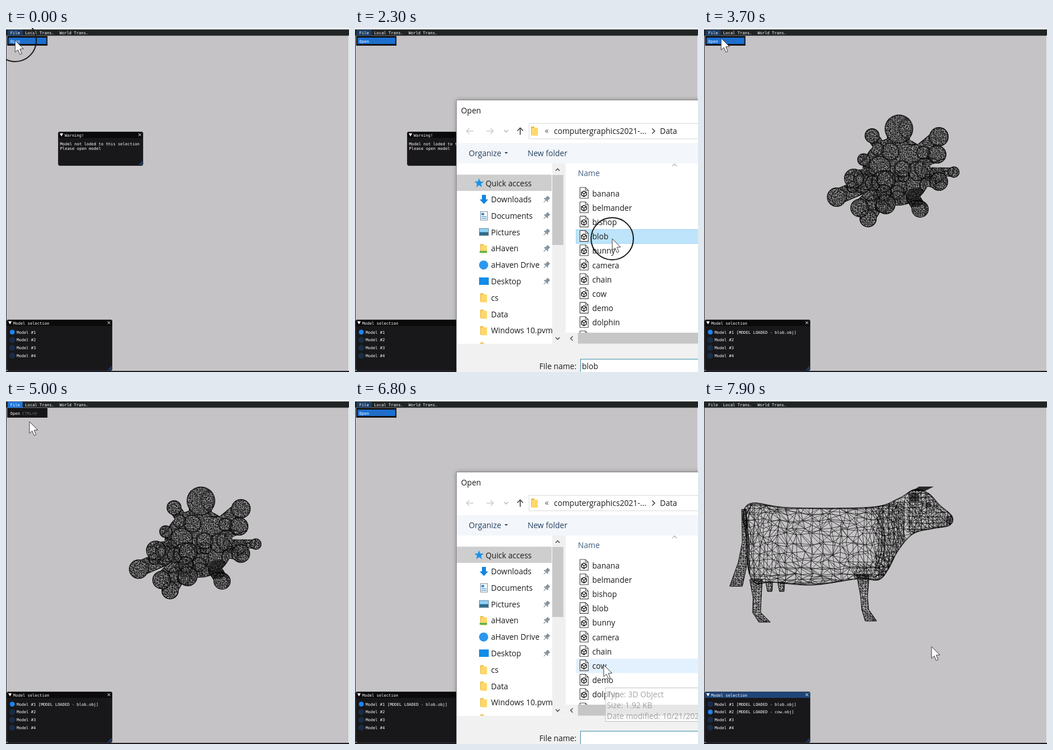
An HTML page with a canvas for the animation above (8 s loop, 600x604 px).

```html
<!DOCTYPE html>
<html lang="en">
<head>
<meta charset="utf-8">
<title>Model viewer</title>
<style>
html, body { margin: 0; width: 100%; height: 100%; overflow: hidden; background: #c5c3c5; }
canvas { display: block; }
</style>
</head>
<body>
<canvas id="stage" width="600" height="604"></canvas>
<script>
const LOOP = 8000, TAU = 2 * Math.PI, BACK = '#c5c3c5';
const MONO = '7px "DejaVu Sans Mono", monospace';
const SANS = '13.6px "Open Sans", "Noto Sans", sans-serif';
const files = ['banana', 'belmander', 'bishop', 'blob', 'bunny', 'camera', 'chain', 'cow', 'demo', 'dolphin', 'duck'];
const places = ['Downloads', 'Documents', 'Pictures', 'aHaven', 'aHaven Drive', 'Desktop', 'cs', 'Data', 'Windows 10.pvm', ''];
// Pointer moves: start, end, x, y
const moves = [
  [700, 1000, 180, 139], [1000, 2100, 450, 370], [2400, 2900, 600, 620], [3000, 3700, 30, 18],
  [3900, 4100, 16, 22], [4500, 4700, 16, 8], [4700, 5000, 41, 38], [5000, 5400, 35, 23],
  [5900, 6500, 435, 465], [7000, 7400, 600, 620], [7500, 7900, 398, 433]
];
const clicks = [[0, 100], [2200, 2400], [4300, 4400], [5500, 5700], [7000, 7100]];

let g = document.getElementById('stage').getContext('2d');

function randomizer(seed) {
  return () => (seed = (seed * 16807) % 2147483647) / 2147483647;
}
function box(x, y, w, h, fill, r = 0) {
  g.fillStyle = fill;
  g.beginPath();
  g.roundRect(x, y, w, h, r);
  g.fill();
}
function frame(x, y, w, h, color) {
  g.strokeStyle = color;
  g.lineWidth = 1;
  g.strokeRect(x + .5, y + .5, w - 1, h - 1);
}
function disc(x, y, r, fill) {
  g.fillStyle = fill;
  g.beginPath();
  g.arc(x, y, r, 0, TAU);
  g.fill();
}
function ring(x, y, r, color, width) {
  g.beginPath();
  g.arc(x, y, r, 0, TAU);
  g.strokeStyle = color;
  g.lineWidth = width;
  g.stroke();
}
function text(s, x, y, color = '#fff', font = MONO) {
  g.font = font;
  g.fillStyle = color;
  g.fillText(s, x, y + (font === MONO ? 2.5 : 5));
}
function trace(p) {
  g.beginPath();
  for (let i = 0; i < p.length; i += 2) g.lineTo(p[i], p[i + 1]);
}
function poly(p, fill) {
  trace(p);
  g.fillStyle = fill;
  g.fill();
}
function line(p, color, width = 1) {
  trace(p);
  g.strokeStyle = color;
  g.lineWidth = width;
  g.stroke();
}
function ngon(x, y, n, outer, inner = outer) {
  return Array.from({ length: n }, (_, k) => {
    const a = k / n * TAU - TAU / 4, r = k % 2 ? inner : outer;
    return [x + r * Math.cos(a), y + r * Math.sin(a)];
  }).flat();
}
// Chevron pointing right, rotated by quarter turns
function chevron(x, y, size, turns, color, width = 1.6) {
  g.save();
  g.translate(x, y);
  g.rotate(turns * TAU / 4);
  line([-size / 2, -size, size / 2, 0, -size / 2, size], color, width);
  g.restore();
}
function clipped(path, draw) {
  g.save();
  g.clip(path);
  draw();
  g.restore();
}
function area(x, y, w, h) {
  const path = new Path2D();
  path.rect(x, y, w, h);
  return path;
}
function prerender(draw) {
  const c = document.createElement('canvas'), main = g;
  c.width = 600;
  c.height = 604;
  g = c.getContext('2d');
  draw();
  g = main;
  return c;
}

// Jittered triangle grid whose cells shrink towards the edges of the box
function mesh([x0, y0, x1, y1], step, width, seed, squeeze = .45) {
  const rnd = randomizer(seed);
  const cols = Math.ceil((x1 - x0) / step), rows = Math.ceil((y1 - y0) / step);
  const warp = u => u - squeeze * Math.sin(u * TAU) / TAU;
  const pts = [];
  for (let j = 0; j <= rows; j++) {
    pts.push([]);
    for (let i = 0; i <= cols; i++) {
      pts[j].push([
        x0 + (x1 - x0) * warp((i + rnd() * .6 - .3) / cols),
        y0 + (y1 - y0) * warp((j + rnd() * .6 - .3) / rows)
      ]);
    }
  }
  g.beginPath();
  for (let j = 1; j <= rows; j++) {
    for (let i = 1; i <= cols; i++) {
      const a = pts[j][i], b = pts[j][i - 1], c = pts[j - 1][i], d = pts[j - 1][i - 1];
      const [from, to] = rnd() < .6 ? [a, d] : [b, c];
      g.moveTo(...b); g.lineTo(...a); g.lineTo(...c);
      g.moveTo(...from); g.lineTo(...to);
    }
  }
  g.strokeStyle = '#000';
  g.lineWidth = width;
  g.stroke();
}

// Arms reaching from a round core: tip x, y, radius
const arms = [
  [341, 177, 25], [411, 191, 17], [294, 189, 13], [279, 231, 11], [437, 253, 10], [411, 270, 16], [408, 222, 16],
  [378, 318, 15], [287, 335, 15], [272, 316, 16], [232, 297, 17], [318, 310, 17], [262, 264, 17]
];
const blob = prerender(() => {
  const rnd = randomizer(42), cx = 337, cy = 252;
  const silhouette = (color, inset) => {
    disc(cx, cy, 60 - inset, color);
    g.lineCap = 'round';
    for (const [x, y, r] of arms) {
      line([cx, cy, x, y], color, 1.6 * (r - inset));
      disc(x, y, r - inset, color);
    }
  };
  const lobe = (x, y, r) => {
    disc(x, y, r, 'rgba(190,188,190,.3)');
    ring(x, y, r, 'rgba(0,0,0,.6)', 2.5);
  };
  silhouette('#000', 0);
  silhouette(BACK, 1.3);
  g.globalCompositeOperation = 'source-atop';
  for (let k = 0; k < 46; k++) {
    const a = rnd() * TAU, d = 85 * Math.sqrt(rnd());
    lobe(cx + d * Math.cos(a), cy + d * Math.sin(a), 8 + 13 * rnd());
  }
  for (const [x, y, r] of arms) lobe(x, y, r);
  disc(370, 297, 17, 'rgba(0,0,0,.55)');
  mesh([212, 148, 450, 354], 3.1, .72, 7, 0);
});

// Closed curve through points
function smooth(p) {
  const n = p.length / 2, at = i => [p[(i + n) % n * 2], p[(i + n) % n * 2 + 1]];
  const path = new Path2D();
  path.moveTo(...at(0));
  for (let i = 0; i < n; i++) {
    const [a, b, c, d] = [-1, 0, 1, 2].map(k => at(i + k));
    path.bezierCurveTo(
      b[0] + (c[0] - a[0]) / 6, b[1] + (c[1] - a[1]) / 6,
      c[0] - (d[0] - b[0]) / 6, c[1] - (d[1] - b[1]) / 6, ...c);
  }
  return path;
}
// Limb from stations: x, y, half width
function limb(stations) {
  const left = stations.map(([x, y, r]) => [x - r, y]), right = stations.map(([x, y, r]) => [x + r, y]);
  const p = [...left, ...right.reverse()].flat(), ys = stations.map(s => s[1]);
  const path = new Path2D('M' + p.join(' ') + 'Z');
  const xs = p.filter((_, i) => i % 2 === 0);
  clipped(path, () => mesh([Math.min(...xs), Math.min(...ys), Math.max(...xs), Math.max(...ys)], 4, .75, 31, .2));
  g.lineWidth = 1;
  g.stroke(path);
}
const cow = prerender(() => {
  const body = smooth([
    84, 181, 150, 189, 292, 188, 340, 173, 368, 157, 393, 164, 412, 184, 434, 204, 430, 220, 400, 226, 366, 235,
    340, 264, 322, 298, 305, 316, 270, 314, 190, 325, 118, 320, 90, 322, 77, 295, 74, 240, 68, 203
  ]);
  const shade = 'rgba(0,0,0,.55)';
  clipped(body, () => {
    mesh([60, 178, 350, 328], 11.5, .72, 11);
    mesh([60, 178, 350, 328], 15, .6, 5);
    mesh([300, 150, 440, 322], 9, .7, 3, .2);
    mesh([355, 150, 440, 232], 6, .7, 9, .2);
    mesh([262, 288, 322, 320], 6.5, .6, 9, .2);
    g.strokeStyle = 'rgba(0,0,0,.3)';
    g.lineWidth = 4;
    g.stroke(body);
    disc(368, 171, 9, shade);
    disc(393, 184, 5, shade);
    disc(429, 211, 7, 'rgba(0,0,0,.4)');
  });
  g.strokeStyle = '#000';
  g.lineWidth = 1;
  g.stroke(body);
  for (const shift of [0, 5]) {
    g.beginPath();
    g.moveTo(290 + shift, 189);
    g.bezierCurveTo(316 + shift, 215, 318 + shift, 262, 300 + shift, 296);
    g.stroke();
  }
  line([84, 183, 74, 200, 78, 245, 79, 305], '#000', 1.4);
  limb([[70, 192, 4], [71, 250, 4], [68, 285, 8], [56, 327, 11]]);
  limb([[91, 315, 11], [93, 348, 7], [92, 373, 7], [106, 390, 10]]);
  limb([[278, 306, 11], [280, 345, 6], [282, 368, 6], [292, 388, 10]]);
  for (const x of [114, 135]) limb([[x, 320, 6], [x + 1, 336, 4]]);
  poly([364, 160, 376, 152, 402, 152, 386, 160], 'rgba(0,0,0,.8)');
});

function windowBox(x, y, w, h, title, focused) {
  box(x, y, w, h, '#18171a', 4);
  box(x, y, w, 11, focused ? '#1f4578' : '#0a0a0b', [4, 4, 0, 0]);
  poly([x + w - 1, y + h - 9, x + w - 1, y + h - 2, x + w - 9, y + h - 1], '#1c3c64');
  g.strokeStyle = '#39393f';
  g.lineWidth = .6;
  g.beginPath();
  g.roundRect(x + .5, y + .5, w - 1, h - 1, 4);
  g.stroke();
  poly([x + 3, y + 3, x + 9, y + 3, x + 6, y + 8.5], '#fff');
  text(title, x + 11.5, y + 6);
  for (const d of [-2.3, 2.3]) line([x + w - 8.3, y + 5.5 - d, x + w - 3.7, y + 5.5 + d], '#fff');
}

function drawApp(t) {
  const loaded = t >= 3200, second = t >= 7800, fileHot = t >= 4600 && t < 5300;
  box(0, 0, 600, 604, BACK);
  if (loaded) g.drawImage(second ? cow : blob, 0, 0);
  box(0, 0, 600, 3, '#f5f5f5');
  box(0, 2.5, 600, 11, '#202425');
  box(0, 13, 1, 590, '#333338');
  box(599, 13, 1, 589, '#f0f0ee');
  box(0, 602, 600, 2, '#1b1c24');
  if (!second) box(3, 3, 26, 10.5, fileHot ? '#1c75dc' : '#1c3d66');
  text('File', 7.5, 8.5);
  text('Local Trans.', 33.5, 8.5);
  text('World Trans.', 93.5, 8.5);
  if (!second) {
    box(2, 14, 70.5, 17, '#161518');
    if (!fileHot) box(4.5, 17, 66, 11, '#1b70d2');
    text('Open', 7.5, 23);
    text('CTRL+O', 28.5, 23, fileHot ? '#707074' : '#3268a4');
  }
  if (!loaded) {
    windowBox(91, 182, 149, 60, 'Warning!');
    text('Model not loded to this selection', 94.5, 203);
    text('Please open model', 94.5, 211);
  }
  windowBox(1, 512, 185, 90, 'Model selection', second);
  for (let i = 0; i < 4; i++) {
    const y = 534 + i * 13.75, name = [loaded && 'blob', second && 'cow'][i];
    disc(11, y, 5.3, '#182c46');
    if (i === +second) disc(11, y, 4, '#1c86f2');
    text(`Model #${i + 1}` + (name ? ` [MODEL LOADED - ${name}.obj]` : ''), 18.5, y);
  }
}

function folder(x, y) {
  box(x - 6, y - 8, 6, 15, '#e9b83c', 1);
  box(x - 5, y - 6, 11, 14, '#ffd86b', 1);
}
function placeIcon(i, y) {
  const x = 225;
  if (i === 0) {
    box(x - 3, y - 8, 7, 9, '#1583e0');
    poly([x - 7, y, x + 8, y, x + .5, y + 8], '#1583e0');
  } else if (i === 1) {
    frame(x - 6, y - 8, 13, 16, '#7c8d9c');
    box(x - 4, y - 5, 5, 4, '#2d8fd8');
    for (const d of [1, 4]) box(x - 4, y + d, 9, 1.2, '#3f94d0');
  } else if (i === 2) {
    box(x - 8, y - 7, 17, 13, '#8fd3f7');
    box(x - 8, y, 17, 6, '#2c6c89');
    frame(x - 8, y - 7, 17, 13, '#7c8d9c');
  } else if (i === 4) disc(x, y, 8, '#2b97ee');
  else if (i === 5) box(x - 8, y - 7, 17, 13, '#118ce8');
  else {
    folder(x, y);
    if (i === 3) box(x - 7, y + 4, 13, 3, '#4fae4b');
  }
}
function pin(x, y) {
  g.save();
  g.translate(x, y);
  g.rotate(.75);
  box(-3, -6, 6, 6, '#87939c');
  box(-4.5, 0, 9, 2, '#87939c');
  box(-.6, 2, 1.2, 5, '#87939c');
  g.restore();
}
function arrow(x, y, turns, color) {
  g.save();
  g.translate(x, y);
  g.rotate(turns * TAU / 4);
  line([-6, 0, 6, 0], color, 1.6);
  chevron(3.5, 0, 5, 0, color);
  g.restore();
}
function fileIcon(x, y) {
  const page = [x - 7, y - 10, x + 2.5, y - 10, x + 7.5, y - 5, x + 7.5, y + 9, x - 7, y + 9, x - 7, y - 10];
  poly(page, '#fff');
  line(page, '#444', 1.1);
  line([x + 2.5, y - 10, x + 2.5, y - 5, x + 7.5, y - 5], '#444');
  const cube = ngon(x, y + 1, 6, 4.9);
  line([...cube, cube[0], cube[1]], '#111', 1.4);
  for (const k of [2, 6, 10]) line([x, y + 1, cube[k], cube[k + 1]], '#111', 1.2);
}

function drawDialog(t, since, pointer) {
  const label = (s, x, y, color = '#1b1b1b') => text(s, x, y, color, SANS);
  const selected = t >= 7000 ? 7 : t >= 2200 && t < 3000 ? 3 : -1;
  g.save();
  g.shadowColor = 'rgba(0,0,0,.4)';
  g.shadowBlur = 8;
  box(178, 126.5, 430, 490, '#fff');
  g.restore();
  line([600, 126.5, 177.5, 126.5, 177.5, 604], '#8d8d8f');
  label('Open', 185.5, 144.5);
  arrow(201, 181, 2, '#cfcfcf');
  arrow(236, 181, 0, '#cfcfcf');
  chevron(264.5, 181, 3.5, 1, '#aaa', 1.2);
  arrow(289, 181.5, 3, '#444');
  frame(304, 167, 310, 28, '#d9d9d9');
  folder(314, 181);
  label('«', 332, 180, '#555');
  label('computergraphics2021-...', 348, 181);
  chevron(522, 181, 4.5, 0, '#444');
  label('Data', 533.5, 181);

  box(178, 202, 422, 36, '#f3f6fa');
  label('Organize', 199, 220, '#24405f');
  poly([261.5, 218, 267.5, 218, 264.5, 221], '#24405f');
  label('New folder', 302, 220, '#24405f');

  box(178, 257.5, 166, 28.5, '#cecece');
  poly(ngon(217, 272.5, 10, 8.5, 3.6), '#1b92ea');
  label('Quick access', 228.5, 272.5);
  clipped(area(178, 238, 167, 316.5), () => places.forEach((name, i) => {
    const y = 301 + i * 28.8;
    placeIcon(i, y);
    label(name, 238, y);
    if (i < 6) pin(335, y);
  }));
  box(345, 238, 23.5, 316.5, '#f0f0f0');
  box(345, 258, 19.5, 123, '#c8c8c8');
  chevron(354.5, 249, 3.5, 3, '#555');
  chevron(354.5, 545, 3.5, 1, '#555');

  label('Name', 390, 255, '#3f5d7e');
  chevron(559, 240.5, 4, 3, '#777', 1);
  clipped(area(368.5, 270, 232, 265), () => files.forEach((name, i) => {
    const y = 290.5 + i * 25.2, hover = pointer[0] > 386 && Math.abs(pointer[1] - y) < 12.6;
    if (i === selected) {
      box(386.5, y - 12.6, 214, 25.2, '#bde4fb');
      frame(386.5, y - 12.6, 220, 25.2, '#a3d6f5');
    } else if (hover) box(386.5, y - 12.6, 214, 25.2, '#e2f1fd');
    fileIcon(400.5, y - .5);
    label(name, 415, y);
  }));
  box(368.5, 535, 232, 19.5, '#f0f0f0');
  box(390, 535, 210, 19.5, '#c6c6c6');
  chevron(379, 545, 3.8, 2, '#555');

  box(178, 554.5, 422, 50, '#f1f1f1');
  label('File name:', 322.5, 594);
  box(394, 581, 220, 30, '#fff');
  frame(394, 581, 220, 30, '#3d8ea6');
  if (selected >= 0) label(files[selected], 397, 594);
  else if (since % 1000 < 500) box(397, 585, 1, 18, '#111');

  if (t >= 6700 && t < 7000) {
    g.save();
    g.globalAlpha = Math.min(1, (t - 6600) / 350);
    box(437.5, 505, 180, 60, '#fff');
    frame(437.5, 505, 180, 60, '#999');
    ['Type: 3D Object', 'Size: 1.92 KB', 'Date modified: 10/21/2021 8:14 PM'].forEach((s, i) =>
      label(s, 440.5, 517 + i * 19, '#666'));
    g.restore();
  }
}

function pointerAt(t) {
  let x = 16, y = 22;
  for (const [from, to, nx, ny] of moves) {
    const f = Math.min(1, Math.max(0, (t - from) / (to - from))), ease = f * (2 - f);
    x += (nx - x) * ease;
    y += (ny - y) * ease;
  }
  return [x, y];
}
function drawPointer([x, y], pressed) {
  if (pressed) ring(x, y, 37, '#1a1a1a', 2);
  const shape = [0, 0, 0, 20.5, 4.8, 16.3, 8.3, 24.5, 11.6, 23, 8.2, 15, 14.5, 14.6, 0, 0].map((v, i) => v + (i % 2 ? y : x));
  poly(shape, '#fff');
  line(shape, '#3a3a3a', 1);
}

function render(now) {
  const t = Math.floor(now % LOOP / 100) * 100, pointer = pointerAt(t);
  const opened = t >= 700 && t < 3000 ? 700 : t >= 6000 && t < 7500 ? 6000 : 0;
  drawApp(t);
  if (opened) drawDialog(t, t - opened, pointer);
  drawPointer(pointer, clicks.some(([a, b]) => t >= a && t < b));
}
const start = performance.now();
function tick() {
  render(performance.now() - start);
  requestAnimationFrame(tick);
}
tick();
</script>
</body>
</html>
```
